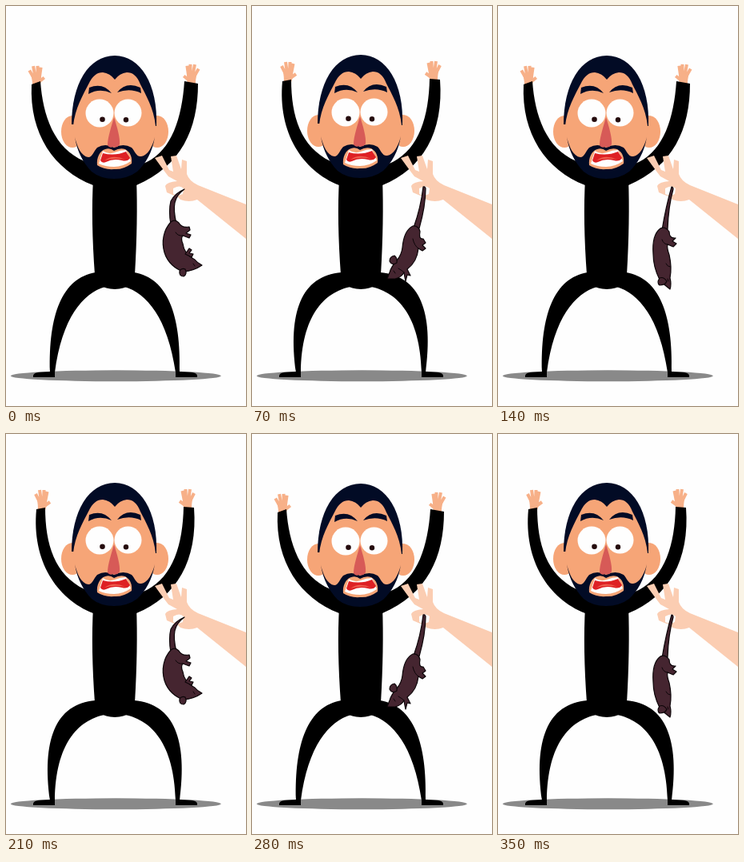
Write an HTML page that moves like this. It is 300 by 500 pixels and loops after 0.42 s.

```html
<!DOCTYPE html>
<html lang="en">
<head>
<meta charset="utf-8">
<title>Man and rat</title>
<style>
  html, body { margin: 0; width: 100%; height: 100%; overflow: hidden; background: #fefefe; }
  svg { display: block; width: 100vw; height: 100vh; }
  .skin { fill: #f6a577; }
  .palm { fill: none; stroke: #f7b088; }
  .navy { fill: #020b25; }
  .white { fill: #fefefe; }
  .pink { fill: #fbcdb2; }
  .rat { fill: #452530; stroke: #0c0508; stroke-width: 1.2; stroke-linejoin: round; }
  .line { fill: none; stroke: #0c0508; stroke-width: 1; stroke-linecap: round; }
</style>
</head>
<body>
<svg viewBox="0 0 300 500">
  <defs>
    <g id="palm">
      <path class="palm" stroke-width="4" d="M-3-4L-8-14M-1-5L-3-19M2-5L2.500-19M4-4L6.500-17M3 1L10-4"/>
      <path fill="#f7b088" d="M-6-7Q0-9 6-7L6 0L4 6H-5Q-5 0-6-7Z"/>
    </g>
  </defs>

  <ellipse cx="137.300" cy="462.300" rx="131.500" ry="7" fill="#898989"/>
  <use id="handL" href="#palm"/>
  <use id="handR" href="#palm"/>
  <path id="limbs"/>
  <path d="M109 216Q106 268 111 336Q112 353 136 354Q160 353 161 336Q165 268 163 216Z"/>
  <path d="M34 464Q33 459 40 458L55 457H61V464ZM239 464Q240 459 233 458L218 457H212V464Z"/>

  <g id="head">
    <ellipse class="skin" cx="83" cy="157" rx="14" ry="20"/>
    <ellipse class="skin" cx="189" cy="157" rx="14" ry="20"/>
    <path class="navy" d="M82 148C82 98 103 62 136 62C168 62 190 98 188 150Z"/>
    <path class="skin" d="M84 150C86 128 97 110 103 98C108 87 114 83 121 83Q130 84 136 92Q142 84 151 83C158 83 164 87 168 98C174 110 185 128 187 150C187 170 178 195 160 205H110C94 195 84 170 84 150Z"/>
    <path class="navy" d="M86 164C89 176 94 188 103 189C108 189 110 181 114 177Q124 171 135 177Q147 171 157 177C161 181 163 189 169 188C177 187 183 176 186 164C183 182 175 197 164 207Q152 216 135 216Q118 216 107 207C97 197 89 182 86 164Z"/>
    <circle class="white" cx="117" cy="134" r="17.500"/>
    <circle class="white" cx="152.500" cy="133.500" r="17"/>
    <circle cx="120.500" cy="141.700" r="3.300" fill="#250b0d"/>
    <circle cx="150" cy="142.200" r="3.200" fill="#250b0d"/>
    <path class="navy" d="M103 110L104 102Q121 95 132 109Q117 102 103 110ZM169 109L168 102Q150 94 139 108Q155 102 169 109Z"/>
    <path fill="#d75a57" d="M135 139C139 152 143 165 142 173Q139 178 134 176Q129 178 127 174C127 164 132 150 135 139Z"/>
    <path class="skin" d="M114 199C113 190 117 181 124 179Q130 177 135 181Q142 177 149 179C156 183 158 190 157 197Q146 205 135 204Q123 205 114 199Z"/>
    <path class="white" d="M116 197L121 181Q128 186 136 183Q143 180 150 180L156 194Q146 201 135 201Q124 201 116 197Z"/>
    <path fill="#de2024" d="M118 193L121 184Q136 188 150 182L155 190Q152 195 145 193Q134 190 125 195Q120 197 118 193Z"/>
    <path fill="#ef604f" d="M123 193Q134 185 149 192Q135 189 123 193Z"/>
  </g>

  <path class="pink" d="M186 190L195 187L204 205L209 207L206 188L213 187L219 204L220 192L226 194L226 210Q229 219 240 224L300 248V291L239 242Q229 246 218 242L214 238Q207 236 201 233L199 225Q201 220 214 219L203 213Q196 204 186 190Z"/>
  <path class="white" d="M209 228Q217 223 222 228L221 235Q215 238 209 235Z"/>

  <g class="rats">
    <path class="rat" d="M223 229Q213 236 211 246Q209 256 213 272L206 273Q203 256 206 244Q211 234 223 229Z"/>
    <path class="rat" d="M206 270C197 280 194 294 198 308C202 321 212 329 222 332Q235 331 245 324Q239 321 236 317C228 313 222 306 221 297Q218 291 221 287L229 290L231 286L225 284L230 280L229 276Q220 278 216 271Q211 266 206 270Z"/>
    <path class="rat" d="M224 310L229 303L232 305L229 309L234 310L232 314Z"/>
    <path class="rat" d="M217 331Q216 338 222 338Q227 335 224 329Q220 327 217 331Z"/>
    <path class="line" d="M212 283Q215 288 221 287M234 322L236 325"/>
  </g>
  <g class="rats">
    <path class="rat" d="M214 226Q216 225 217 228Q217 250 209 278L202 277Q211 252 214 226Z"/>
    <path class="rat" d="M201 275C193 279 189 290 188 302Q187 311 181 318Q174 326 172 333L169 341L179 341Q187 339 190 333Q191 340 192 344L194 336L198 337L194 329C202 323 207 313 208 303L213 306L217 303L213 299L217 296L214 291Q208 292 210 282Q208 274 201 275Z"/>
    <path class="rat" d="M181 321Q175 325 172 319Q172 313 178 312Q182 315 181 321Z"/>
    <path class="line" d="M201 291Q203 300 208 303M177 331L179 334M183 328Q188 331 190 333"/>
  </g>
  <g class="rats">
    <path class="rat" d="M217 226Q219 226 219 229Q213 250 212 279L205 280Q210 250 217 226Z"/>
    <path class="rat" d="M203 278C195 284 193 297 194 310C194 324 198 334 202 342Q208 349 215 354Q217 348 215 340C217 330 216 320 214 311Q211 303 212 298L219 301L223 297L218 294L222 290Q214 291 214 282Q209 275 203 278Z"/>
    <path class="rat" d="M202 340Q198 346 202 349Q209 349 211 344Q207 338 202 340Z"/>
    <path class="line" d="M205 292Q207 298 212 298M212 341L213 344M210 322Q212 326 215 326"/>
  </g>
</svg>
<script>
const STEP = 70;
const $ = id => document.getElementById(id);
const rats = document.querySelectorAll('.rats');

// Two body poses: raised wide, and lifted with the knees out
const poses = [
  {
    left: [38, 94, -3], right: [232, 92, 3], headY: 0,
    limbs: 'M32 98L43 94C46 137 60 178 98 194L136 212L176 195C207 180 220 140 223 94L240 97' +
      'C240 154 219 200 163 224H109C60 205 29 160 32 98Z' +
      'M112 333C70 340 53 386 55 458H61C70 390 96 359 124 351H148C176 359 202 390 212 458H217' +
      'C219 386 202 340 160 333Z'
  },
  {
    left: [45, 89, 0], right: [227, 88, 0], headY: -1,
    limbs: 'M38 94L49 92C49 138 61 176 98 194L136 212L176 195C209 178 221 138 222 91L235 92' +
      'C240 158 213 204 163 224H109C63 206 32 158 38 94Z' +
      'M112 333C61 337 45 384 55 458H61C62 387 90 358 123 351H149C182 358 210 387 212 458H217' +
      'C227 384 211 337 160 333Z'
  }
];

function placeHand(id, [x, y, turn], flip) {
  $(id).setAttribute('transform', `translate(${x} ${y}) rotate(${turn}) scale(${flip} 1)`);
}

function draw(time) {
  const step = Math.floor(time / STEP) % 6;
  const pose = poses[step % 2];
  $('limbs').setAttribute('d', pose.limbs);
  $('head').setAttribute('transform', `translate(0 ${pose.headY})`);
  placeHand('handL', pose.left, 1);
  placeHand('handR', pose.right, -1);
  rats.forEach((rat, i) => rat.style.display = i === step % 3 ? '' : 'none');
}

let start;
function tick(now) {
  start ??= now;
  draw(now - start);
  requestAnimationFrame(tick);
}
draw(0);
requestAnimationFrame(tick);
</script>
</body>
</html>
```
